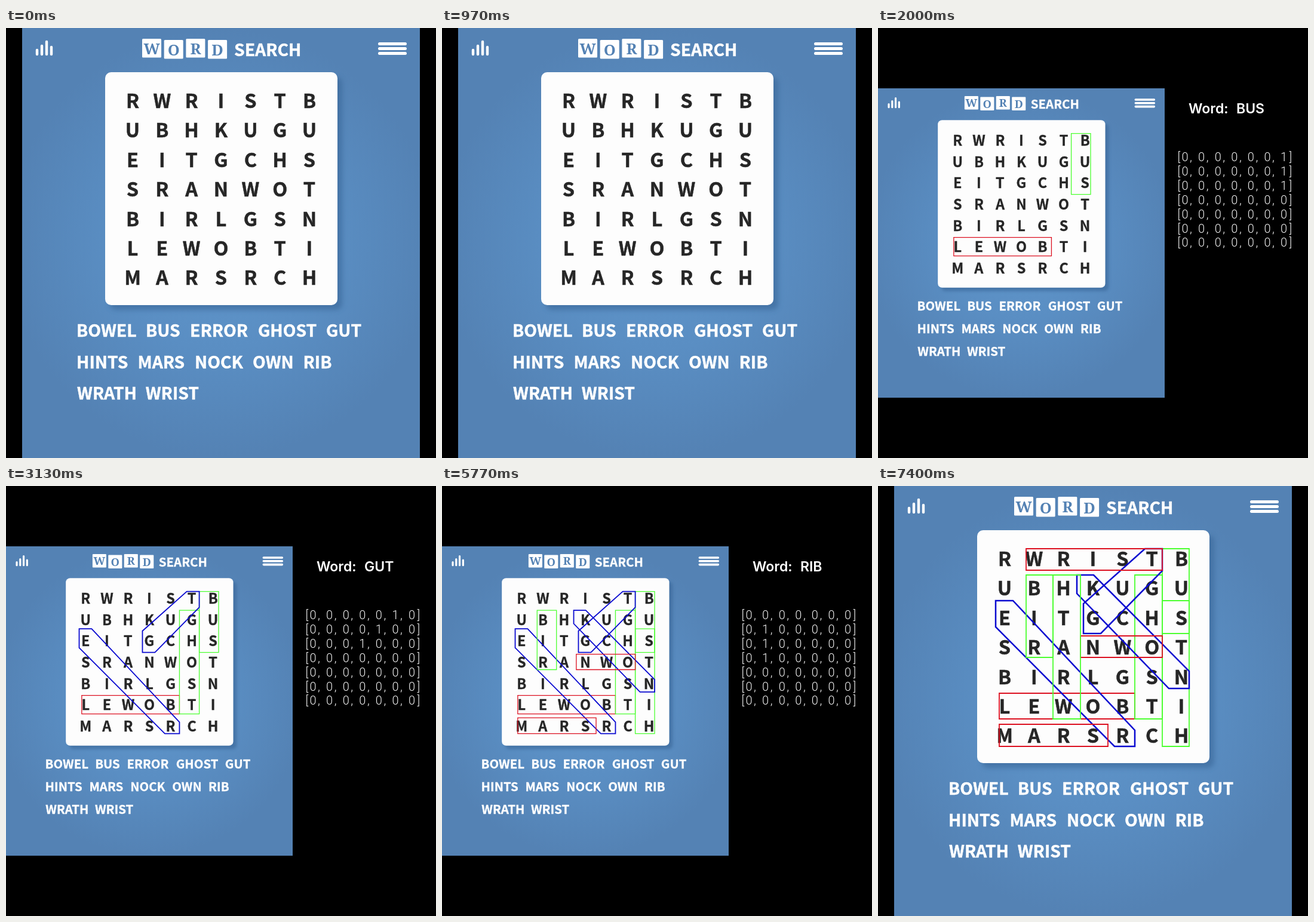
Animation, 720 px wide and 720 px high, one loop 8960 ms. Source, as an HTML page:

```html
<!DOCTYPE html>
<html lang="en">
<head>
<meta charset="utf-8">
<title>Word search</title>
<style>
html, body { margin: 0; width: 100%; height: 100%; overflow: hidden; background: #000; }
svg { display: block; width: 100%; height: 100%; }
text { font-family: 'Noto Sans CJK JP', 'Noto Sans CJK SC', 'Open Sans', sans-serif; font-weight: 700; }
.grid text { font-size: 32.5px; fill: #262626; stroke: #262626; stroke-width: .5; text-anchor: middle; }
.list text, .title { font-size: 28.3px; fill: #fff; stroke: #fff; stroke-width: .5; }
.tiles text { font: 700 25.5px 'Noto Serif', serif; fill: #5482b4; text-anchor: middle; }
.boxes path { fill: none; }
.side text { font-family: Roboto, sans-serif; font-weight: 300; font-size: 20px; fill: #f4f4f4; text-anchor: middle; }
.side .word { font-family: Inter, sans-serif; font-weight: 600; font-size: 23px; fill: #fff; text-anchor: start; }
</style>
</head>
<body>
<svg viewBox="0 0 720 720">
  <defs>
    <radialGradient id="glow" gradientUnits="userSpaceOnUse" cx="360" cy="360" r="360">
      <stop offset="0" stop-color="#6096cb"/>
      <stop offset=".5" stop-color="#5a8ec3"/>
      <stop offset="1" stop-color="#5482b4"/>
    </radialGradient>
    <filter id="blur" x="-10%" y="-10%" width="120%" height="120%"><feGaussianBlur stdDeviation="4"/></filter>
  </defs>
  <g id="panel">
    <rect x="27" width="666" height="720" fill="url(#glow)"/>
    <g fill="none" stroke="#fff" stroke-linecap="round">
      <path stroke-width="4.4" d="M52 37V44M60 30V44M68 23V44M76 32V44"/>
      <path stroke-width="5" d="M625.5 26.5H668.5M625.5 34.5H668.5M625.5 42.5H668.5"/>
    </g>
    <g class="tiles" id="tiles"></g>
    <text class="title" x="382" y="47">SEARCH</text>
    <rect x="174" y="82" width="389" height="390" rx="10" fill="#386596" opacity=".6" filter="url(#blur)"/>
    <rect x="166" y="74" width="389" height="390" rx="10" fill="#fdfdfd"/>
    <g class="grid" id="grid"></g>
    <g class="list" id="list"></g>
    <g class="boxes" id="boxes"></g>
  </g>
  <g class="side" id="side"></g>
</svg>
<script>
const LOOP = 8960, START = 1000, STEP = 516;
const RED = '#dc1020', GREEN = '#4cff30', BLUE = '#0808d0';
const $ = id => document.getElementById(id);

function add(parent, tag, attrs, content = '') {
  const el = document.createElementNS('http://www.w3.org/2000/svg', tag);
  for (const key in attrs) el.setAttribute(key, attrs[key]);
  el.textContent = content;
  parent.appendChild(el);
  return el;
}
const rect = (x1, y1, x2, y2) => `M${x1} ${y1}H${x2}V${y2}H${x1}Z`;

// word, first row, first column, row step, column step, colour, outline
const words = [
  ['BOWEL', 5, 4, 0, -1, RED, rect(203, 347, 430, 390)],
  ['BUS', 0, 6, 1, 0, GREEN, rect(476, 105, 521, 247)],
  ['ERROR', 2, 0, 1, 1, BLUE, 'M197 192H226L430 409V436H396L197 236Z'],
  ['GHOST', 1, 5, 1, 0, GREEN, rect(430, 149, 476, 390)],
  ['GUT', 2, 3, -1, 1, BLUE, 'M447 105H476V142L373 247H344V197Z'],
  ['HINTS', 6, 6, -1, 0, GREEN, rect(476, 192, 521, 436)],
  ['MARS', 6, 0, 0, 1, RED, rect(203, 399, 385, 436)],
  ['NOCK', 4, 6, -1, -1, BLUE, 'M333 149H361L521 310V339H487L333 180Z'],
  ['OWN', 3, 5, 0, -1, RED, rect(339, 251, 476, 287)],
  ['RIB', 3, 1, -1, 0, GREEN, rect(248, 149, 293, 287)],
  ['WRATH', 5, 2, -1, 0, GREEN, rect(293, 149, 339, 390)],
  ['WRIST', 0, 1, 0, 1, RED, rect(248, 105, 476, 141)]
];

[...'WORD'].forEach((ch, i) => {
  const x = 228 + i * 36.7, y = 18 + (i % 2) * 2;
  add($('tiles'), 'rect', { x, y, width: 32, height: 31.5, rx: 1.5, fill: '#fff' });
  add($('tiles'), 'text', { x: x + 16, y: y + 25.5 }, ch);
});

['RWRISTB', 'UBHKUGU', 'EITGCHS', 'SRANWOT', 'BIRLGSN', 'LEWOBTI', 'MARSRCH'].forEach((line, r) =>
  [...line].forEach((ch, c) =>
    add($('grid'), 'text', { x: 212 + c * 49.33, y: 134 + r * 49.4 }, ch)));

const lefts = [118, 234, 308, 422, 536, 118, 220.5, 316, 413, 497.5, 119, 233.7];
words.forEach(([word], i) =>
  add($('list'), 'text', { x: lefts[i], y: 517 + Math.floor(i / 5) * 52.7 }, word));

const boxes = words.map(([, , , , , stroke, d]) =>
  add($('boxes'), 'path', { d, stroke, 'stroke-width': stroke === BLUE ? 2.5 : 1.8 }));

add($('side'), 'text', { class: 'word', x: 520, y: 142.5 }, 'Word:');
const label = add($('side'), 'text', { class: 'word', x: 600, y: 142.5 });
const cells = [];
for (let r = 0; r < 7; r++) {
  const y = 223 + r * 23.9;
  add($('side'), 'text', { x: 504, y }, '[');
  add($('side'), 'text', { x: 691, y }, ']');
  for (let c = 0; c < 7; c++) {
    const x = 514 + c * 27.6;
    cells.push(add($('side'), 'text', { x, y }, '0'));
    if (c < 6) add($('side'), 'text', { x: x + 10, y }, ',');
  }
}

let shown;
function show(step) {
  if (step === shown) return;
  shown = step;
  const solving = step >= 0 && step < words.length;
  $('panel').setAttribute('transform',
    solving ? 'translate(0 101) scale(.7207 .7195) translate(-27 0)' : '');
  $('side').style.display = solving ? '' : 'none';
  boxes.forEach((box, i) => { box.style.display = i <= step ? '' : 'none'; });
  if (!solving) return;
  const [word, row, col, dr, dc] = words[step];
  label.textContent = word;
  cells.forEach(cell => { cell.textContent = '0'; });
  for (let i = 0; i < word.length; i++)
    cells[(row + dr * i) * 7 + col + dc * i].textContent = '1';
}

function tick() {
  const t = performance.now() % LOOP;
  show(Math.max(-1, Math.min(words.length, Math.floor((t - START) / STEP))));
  requestAnimationFrame(tick);
}
tick();
</script>
</body>
</html>
```
